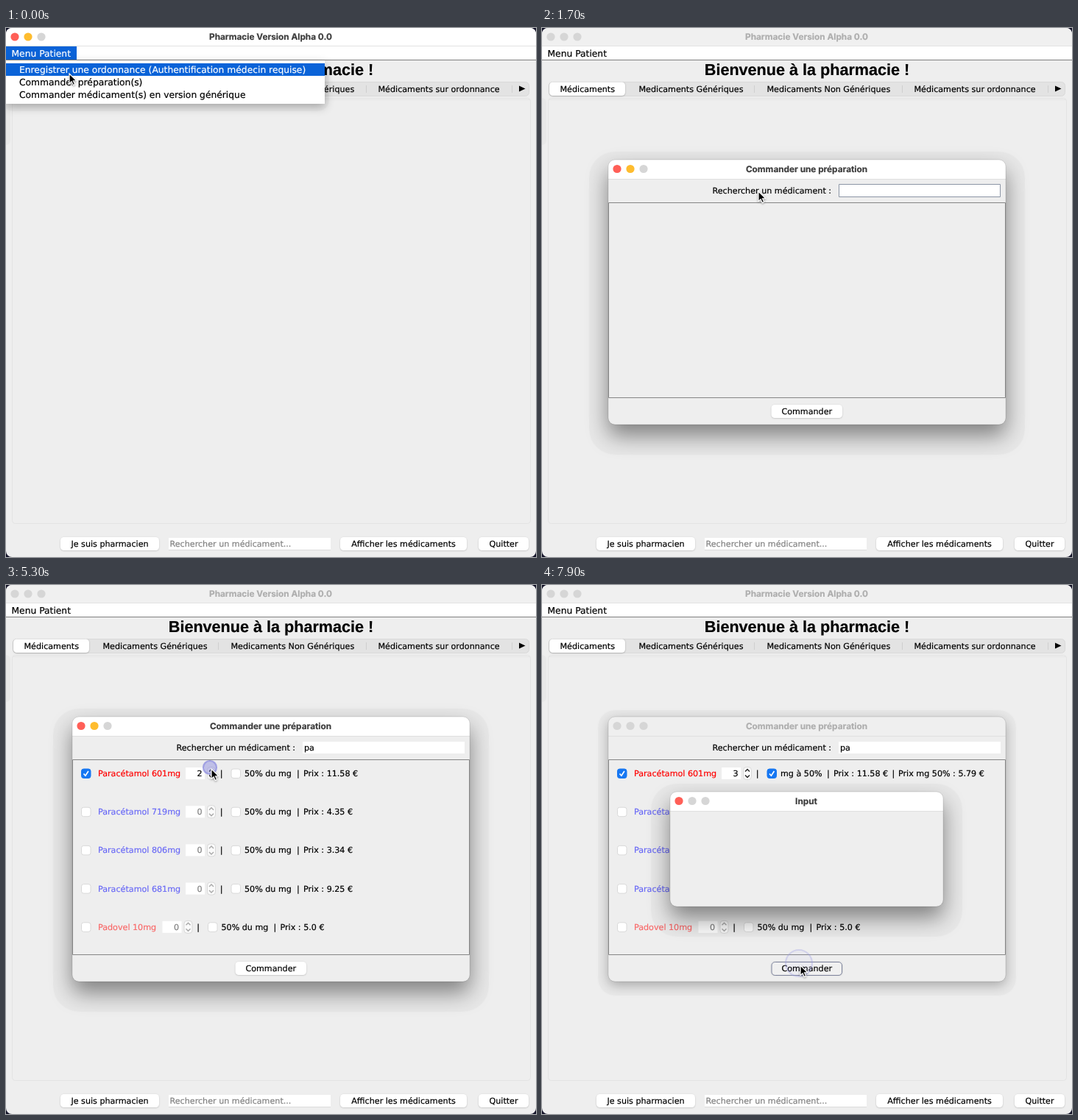
An HTML page with a canvas that plays this animation: 720 px wide and 719 px high, repeating every 8 s.

```html
<!DOCTYPE html>
<html lang="fr">
<head>
<meta charset="utf-8">
<title>Pharmacie</title>
<style>
html, body { margin: 0; width: 100%; height: 100%; overflow: hidden; background: #15152a; }
canvas { display: block; width: 720px; height: 719px; }
</style>
</head>
<body>
<canvas id="stage" width="720" height="719"></canvas>
<script>
const g = document.getElementById('stage').getContext('2d');
const LOOP = 8000, STEP = 100;
const UI = '11.15px "DejaVu Sans", sans-serif';
const MENU = '12.3px "DejaVu Sans", sans-serif';
const TITLE = '700 11.8px Inter, sans-serif';
const HEAD = '700 21.6px "Liberation Sans", Arial, sans-serif';
const BG = '#eeeeee', BLUE = '#0a63d8';
const LIT = ['#ff5f57', '#febc2e', 0], DIM = [0, 0, 0];

// Moments of the story, in ms
const AT = { item2: 200, closeMenu: 400, dialog: 500, typed: 2700, check: 4100, half: 6300, press: 7600, input: 7800 };

// Pointer tip: time, x, y
const PATH = [
  [0, 86, 62], [100, 86, 66], [200, 87, 71], [600, 87, 71], [900, 104, 80],
  [1000, 172, 118], [1100, 259, 162], [1200, 259, 162], [1700, 294, 222],
  [2700, 294, 222], [3200, 190, 246], [3300, 190, 246], [3800, 110, 254],
  [4100, 110, 254], [4300, 198, 256], [4700, 279, 250], [5700, 279, 250],
  [6100, 311, 254], [6900, 311, 254], [7400, 351, 519], [7600, 351, 517]
];
// Mouse presses: time, x, y
const CLICKS = [
  [300, 87, 71], [4000, 110, 254], [4900, 279, 250], [5300, 279, 250],
  [5600, 279, 250], [6200, 311, 254], [7600, 351, 516]
];
const ROWS = [
  ['Paracétamol 601mg', 'red', '11.58 €', 0],
  ['Paracétamol 719mg', 'blue', '4.35 €', 0],
  ['Paracétamol 806mg', 'blue', '3.34 €', 0],
  ['Paracétamol 681mg', 'blue', '9.25 €', 0],
  ['Padovel 10mg', 'red', '5.0 €', -31.5]
];

// A hairline stroke gives the slightly heavier desktop rendering
function text(s, x, y, color = '#000', font = UI, align = 'left') {
  g.font = font;
  g.textAlign = align;
  g.fillStyle = g.strokeStyle = color;
  g.lineWidth = .2;
  g.fillText(s, x, y);
  g.strokeText(s, x, y);
}

function rect(x, y, w, h, color) {
  g.fillStyle = color;
  g.fillRect(x, y, w, h);
}

function box(x, y, w, h, r, fill, line) {
  g.beginPath();
  g.roundRect(x, y, w, h, r);
  if (fill) { g.fillStyle = fill; g.fill(); }
  if (line) { g.strokeStyle = line; g.lineWidth = 1; g.stroke(); }
}

function poly(points, color, width, fill) {
  g.beginPath();
  points.forEach(([x, y]) => g.lineTo(x, y));
  if (fill) { g.closePath(); g.fillStyle = fill; g.fill(); }
  if (color) { g.strokeStyle = color; g.lineWidth = width; g.stroke(); }
}

function shadowed(alpha, blur, dy, draw) {
  g.save();
  g.shadowColor = `rgba(0,0,0,${alpha})`;
  g.shadowBlur = blur;
  g.shadowOffsetY = dy;
  draw();
  g.restore();
}

// Flat outer band around a window shadow
function halo(x, y, w, h, spread, dy) {
  box(x - spread, y - spread + dy, w + 2 * spread, h + 2 * spread, spread + 9, 'rgba(0,0,0,.025)');
}

function lights(x, y, colors) {
  colors.forEach((c, i) => {
    g.beginPath();
    g.arc(x + 18 * i, y, 5.6, 0, 7);
    g.fillStyle = c || '#d6d6d6';
    g.fill();
  });
}

function button(label, x, y, w, focused) {
  shadowed(.22, 2, .6, () => box(x, y, w, 18, 4.5, focused ? '#f0f0f0' : '#fff'));
  if (focused) box(x + .5, y + .5, w - 1, 18, 4.5, null, '#7d839c');
  text(label, x + w / 2, y + 13, '#000', UI, 'center');
}

function checkbox(x, y, on) {
  box(x - 6, y - 6, 12.5, 12.5, 3, on ? '#1677f2' : '#fff', on ? '#1677f2' : '#d9d9d9');
  if (on) poly([[x - 3, y + .5], [x - .6, y + 3.2], [x + 3.4, y - 3]], '#fff', 1.7);
}

function spinner(x, y, value, on) {
  const ink = on ? '#000' : '#808080', arrow = on ? '#222' : '#a8a8a8';
  rect(x, y - 8, 26, 16, '#fff');
  text(value, x + 22.5, y + 4, ink, UI, 'right');
  box(x + 29.5, y - 8.5, 11, 17, 4, '#fafafa', '#d8d8d8');
  for (const d of [-1, 1]) {
    poly([[x + 32, y + 2.5 * d], [x + 35, y + 5.5 * d], [x + 38, y + 2.5 * d]], arrow, 1.4);
  }
}

function mainWindow(t) {
  const active = t < AT.dialog, open = t < AT.closeMenu;
  box(0, 0, 720, 719, 8, BG);
  box(0, 0, 720, 25, [8, 8, 0, 0], active ? '#fff' : '#f0f0f0');
  lights(12, 12, active ? LIT : DIM);
  text('Pharmacie Version Alpha 0.0', 359.5, 16, active ? '#3d3d3d' : '#aeaeae', TITLE, 'center');
  rect(0, 24, 720, 1, '#e2e2e2');
  rect(0, 25, 720, 18, '#fff');
  rect(0, 43, 720, 1, '#808080');
  text('Bienvenue à la pharmacie !', 360, 64, '#000', HEAD, 'center');

  box(8.5, 95.5, 704, 578, 4, BG, '#e3e3e3');
  rect(9, 97, 703, 1, '#e6e6e6');
  box(-8, 95, 14, 64, 6, '#e8e8e8');
  box(9.5, 73.5, 701, 19, 5, '#e3e3e3', '#d9d9d9');
  shadowed(.3, 2, .5, () => box(10, 73.5, 103, 18.5, 4.5, '#fff'));
  text('Médicaments', 24.5, 87);
  text('Medicaments Génériques', 131.5, 87);
  text('Medicaments Non Génériques', 305.5, 87);
  text('Médicaments sur ordonnance', 505.5, 87);
  for (const x of [288, 489, 687]) rect(x, 78, 1, 10, '#cfcfcf');
  poly([[697, 78.5], [705.5, 82.5], [697, 86.5]], null, 0, '#000');

  button('Je suis pharmacien', 74, 692, 134);
  rect(221, 693, 220, 17, '#fff');
  rect(221, 709, 220, 1, '#dcdcdc');
  text('Rechercher un médicament...', 222.5, 705, '#808080');
  button('Afficher les médicaments', 454, 692, 172);
  button('Quitter', 642, 692, 68);

  if (open) {
    rect(0, 25, 96, 18, BLUE);
    popup(t);
  }
  text('Menu Patient', 7.5, 38.5, open ? '#fff' : '#000', MENU);
}

function popup(t) {
  const sel = t < AT.item2 ? 0 : 1;
  halo(0, 48, 433, 55, 6, 4);
  shadowed(.3, 12, 4, () => rect(0, 45, 433, 58, '#fff'));
  rect(0, 44, 433, 59, '#fff');
  rect(0, 48 + 17 * sel, 433, 17, BLUE);
  ['Enregistrer une ordonnance (Authentification médecin requise)',
   'Commander préparation(s)',
   'Commander médicament(s) en version générique'
  ].forEach((s, i) => text(s, 18, 61.3 + 17 * i, i === sel ? '#fff' : '#000', MENU));
}

function frame(x, y, w, h, title, colors, active) {
  const [alpha, blur, dy, spread] = active ? [.45, 30, 15, 26] : [.28, 16, 5, 14];
  halo(x, y, w, h, spread, dy);
  shadowed(alpha, blur, dy, () => box(x, y, w, h, 9, BG));
  box(x, y, w, 26, [9, 9, 0, 0], active ? '#fff' : '#efefef');
  rect(x, y + 26, w, 1, '#e0e0e0');
  box(x, y, w, h, 9, null, 'rgba(0,0,0,.12)');
  lights(x + 12, y + 12.5, colors);
  text(title, x + w / 2 - .5, y + 16.5, active ? '#3d3d3d' : '#aeaeae', TITLE, 'center');
}

function caretOn(t) {
  const since = t < AT.typed ? t : t - AT.typed;
  return t < 1500 || Math.floor(since / 500) % 2 === 0;
}

function searchField(t) {
  const focus = t < AT.check, typed = t >= AT.typed;
  text('Rechercher un médicament :', 231.5, 225);
  rect(403, 213, 220, 16, '#fff');
  if (focus) {
    box(403.5, 212.5, 219, 17, 0, null, '#8b95a5');
    if (caretOn(t)) rect(typed ? 418.5 : 405, 214, 1, 14, '#000');
  }
  if (typed) text('pa', 405, 225);
}

function row([name, hue, price, dx], i, t) {
  const y = 256 + 52.2 * i, base = y + 4;
  const on = i === 0 && t >= AT.check, half = i === 0 && t >= AT.half;
  const tint = hue === 'red' ? (on ? '#f00' : '#f96a6a') : '#6a6af6';
  const count = on ? CLICKS.slice(2, 5).filter(c => t >= c[0]).length : 0;
  checkbox(108.5, y, on);
  text(name, 125, base, tint);
  spinner(244 + dx, y, count, on);
  text('|', 290.7 + dx, base);
  checkbox(312 + dx, y, half);
  text(half ? 'mg à 50%' : '50% du mg', 324 + dx, base);
  const x = (half ? 387 : 395) + dx;
  text('|', x, base);
  text('Prix : ' + price, x + 9, base);
  if (half) {
    text('|', 475.5, base);
    text('Prix mg 50% : 5.79 €', 484, base);
  }
}

function orderDialog(t) {
  const active = t < AT.input;
  frame(90, 179, 540, 360, 'Commander une préparation', active ? LIT : DIM, active);
  searchField(t);
  box(90.5, 237.5, 539, 265, 0, null, '#858585');
  if (t >= AT.typed) ROWS.forEach((r, i) => row(r, i, t));
  button('Commander', 311.5, 512, 96.5, t >= AT.press);
}

// Press ring: filled at first, then widening and fading
function ring(t) {
  const hit = CLICKS.filter(c => c[0] <= t).pop();
  if (!hit) return;
  const age = t - hit[0];
  if (age > 400) return;
  const fade = 1 - age / 480;
  g.beginPath();
  g.arc(hit[1] - 2, hit[2] - 2, 9 + age * .03, 0, 7);
  g.fillStyle = `rgba(120,120,220,${age ? .12 * fade : .4})`;
  g.fill();
  g.strokeStyle = `rgba(150,150,225,${.85 * fade})`;
  g.lineWidth = 2.2;
  g.stroke();
}

function pointer(t) {
  const last = PATH[PATH.length - 1];
  const n = PATH.findIndex(p => p[0] > t);
  const b = n < 0 ? last : PATH[n], a = n < 0 ? last : PATH[n - 1];
  const k = b === a ? 0 : (t - a[0]) / (b[0] - a[0]);
  g.save();
  g.translate(a[1] + (b[1] - a[1]) * k, a[2] + (b[2] - a[2]) * k);
  shadowed(.3, 3, 1, () => poly(
    [[0, 0], [0, 13.5], [3.1, 10.8], [5.2, 15.6], [7.6, 14.6], [5.5, 9.9], [9.6, 9.6], [0, 0]],
    '#fff', 1.2, '#000'));
  g.restore();
}

function draw(t) {
  rect(0, 0, 720, 719, '#15152a');
  mainWindow(t);
  if (t >= AT.dialog) orderDialog(t);
  if (t >= AT.input) frame(174, 281, 371, 156, 'Input', ['#ff5f57', 0, 0], true);
  ring(t);
  pointer(t);
}

g.textRendering = 'geometricPrecision';
let start;
function tick(now) {
  start ??= now;
  draw(Math.floor((now - start) % LOOP / STEP) * STEP);
  requestAnimationFrame(tick);
}
requestAnimationFrame(tick);
</script>
</body>
</html>
```
